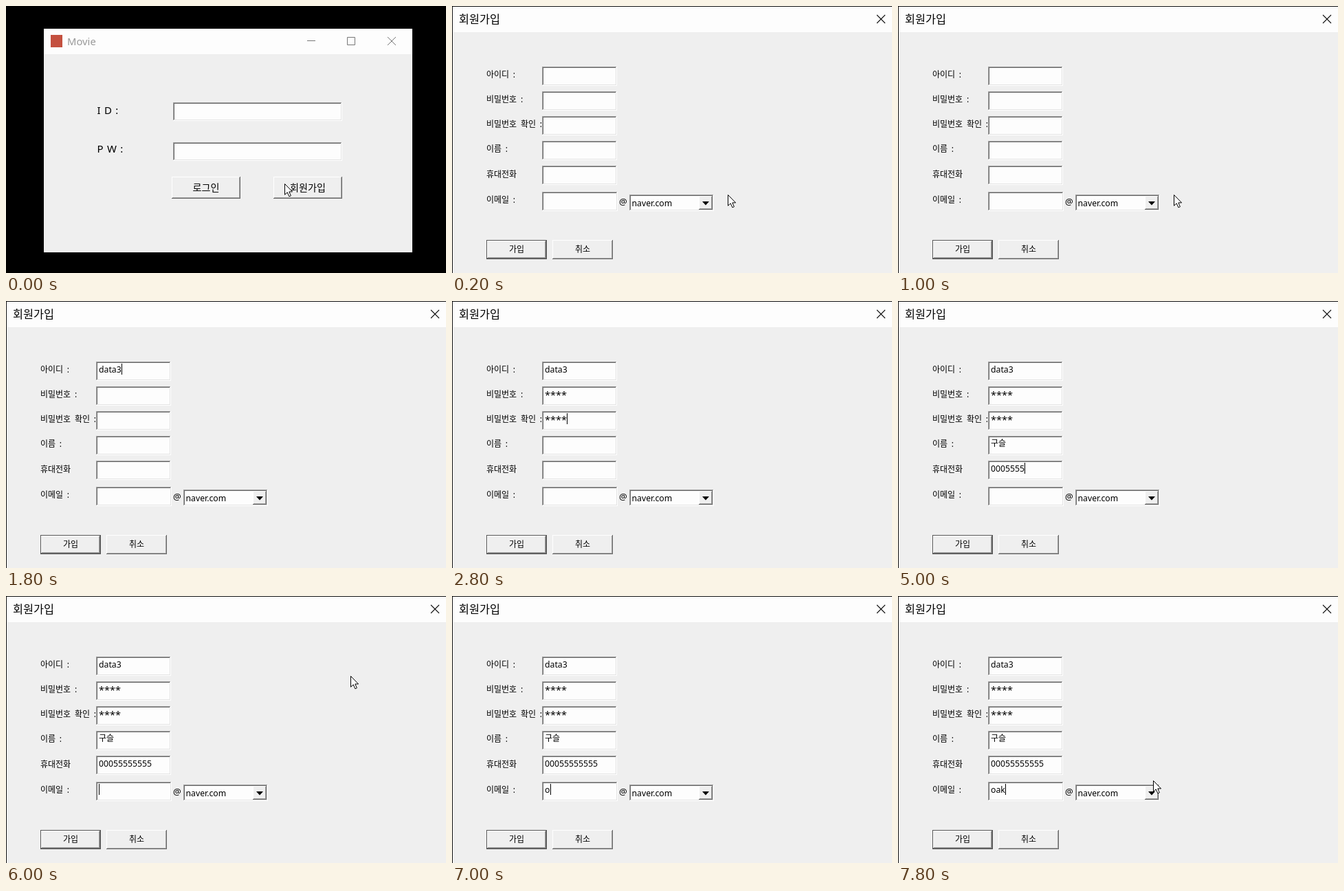
An HTML page that plays this animation: 640 px wide and 388 px high, repeating every 8000 ms.

```html
<!DOCTYPE html>
<html lang="ko">
<head>
<meta charset="utf-8">
<title>회원가입</title>
<style>
  html, body { margin: 0; width: 100%; height: 100%; overflow: hidden; background: #000; }
  svg { display: block; width: 100vw; height: 100vh; }
  text { font-family: "Noto Sans", "Noto Sans CJK KR", "Noto Sans CJK", sans-serif; fill: #000; white-space: pre; }
</style>
</head>
<body>
<svg id="stage" viewBox="0 0 640 388">
  <g id="login"></g>
  <g id="join"></g>
  <g id="pointer">
    <path d="M.5 .5V16.2L4.2 12.8L6.9 18.8L9.4 17.7L6.8 11.9H11.6Z" fill="#fff" stroke="#000"/>
  </g>
</svg>
<script>
const LOOP = 8000, STEP = 200;
const $ = id => document.getElementById(id);

function add(parent, tag, attrs, content) {
  const el = document.createElementNS("http://www.w3.org/2000/svg", tag);
  for (const key in attrs) el.setAttribute(key, attrs[key]);
  if (content) el.textContent = content;
  return parent.appendChild(el);
}
const rect = (g, x, y, width, height, fill) => add(g, "rect", { x, y, width, height, fill });
const line = (g, d, stroke = "#000", width = 1) =>
  add(g, "path", { d, stroke, "stroke-width": width, fill: "none" });
const label = (g, x, y, size, str, more) => add(g, "text", { x, y, "font-size": size, ...more }, str);

// Rectangle with separate top-left and bottom-right edge colours
function bevel(g, x, y, w, h, fill, light, dark) {
  rect(g, x, y, w, h, dark);
  rect(g, x, y, w - 1, h - 1, light);
  rect(g, x + 1, y + 1, w - 2, h - 2, fill);
}
function sunken(g, x, y, w, h) {
  bevel(g, x, y, w, h, "#fff", "#a0a0a0", "#fff");
  bevel(g, x + 1, y + 1, w - 2, h - 2, "#fdfdfd", "#696969", "#e3e3e3");
}
function raised(g, x, y, w, h) {
  bevel(g, x, y, w, h, "#efefef", "#fff", "#696969");
  bevel(g, x + 1, y + 1, w - 2, h - 2, "#efefef", "#efefef", "#a0a0a0");
}
function button(g, x, y, w, h, str, size) {
  raised(g, x, y, w, h);
  label(g, x + w / 2, y + h / 2 + size * .36, size, str, { "text-anchor": "middle" });
}

function buildLogin(g) {
  rect(g, 0, 0, 640, 388, "#000");
  rect(g, 55, 33, 536, 325, "#efefef");
  rect(g, 55, 33, 536, 37, "#fdfdfd");
  rect(g, 65, 42, 17, 18, "#c4503f");
  label(g, 89, 57, 14.8, "Movie", { style: "fill:#999" });
  line(g, "M438 50.5H450M496.5 45.5H507.5V56.5H496.5ZM555 45L567 57M567 45L555 57", "#777");
  label(g, 132.5, 157, 15, "I D :", { "word-spacing": 1.5 });
  label(g, 132.5, 213, 15, "P W :", { "word-spacing": 1.5 });
  sunken(g, 243, 140, 246, 27);
  sunken(g, 243, 198, 246, 27);
  button(g, 241, 248, 100, 32, "로그인", 14.1);
  button(g, 389, 248, 100, 32, "회원가입", 14.1);
}

const rows = [
  ["아이디 :", 88, 104], ["비밀번호 :", 124, 140], ["비밀번호 확인 :", 160, 176],
  ["이름 :", 196, 212], ["휴대전화", 232, 249], ["이메일 :", 270, 286]
];

// Successive contents of each field from its start time; "" means only focused
const NAME = 3;
const entries = [
  { start: 400, keys: ["", "", "", "", "", "d", "dat", "data3"] },
  { start: 2000, keys: ["**", "****"] },
  { start: 2400, keys: ["", "**", "****"] },
  { start: 3000, keys: ["", "ㄱ", "굿", "구스", "구슬", "구슬"] },
  { start: 4200, keys: ["", "", "", "000", "0005555", "0005555555", "00055555555"] },
  { start: 5600, keys: ["", "", "", "", "", "", "", "o", "oa", "oak"] }
];
const composing = t => t >= 3200 && t < 4000;

const fields = [];
let mark, caret, markText;

function buildJoin(g) {
  rect(g, 0, 0, 640, 388, "#efefef");
  rect(g, 0, 0, 640, 38, "#fdfdfd");
  line(g, "M0 .5H640M.5 0V388", "#111");
  label(g, 10, 24.5, 16.3, "회원가입");
  line(g, "M618 13L630 25M630 13L618 25", "#111", 1.1);
  rows.forEach(([name, y, base], i) => {
    label(g, 50, base, 12, name, { "word-spacing": 2.6 });
    sunken(g, 131, y, i == 5 ? 110 : 109, 28);
    const secret = i == 1 || i == 2;
    const size = secret ? 14.5 : i == NAME ? 12 : 12.25;
    fields.push(label(g, 135, y + (secret ? 18 : i == NAME ? 15 : 16), size, ""));
  });
  label(g, 243, 289, 13, "@");
  sunken(g, 258, 274, 123, 24);
  label(g, 261.5, 291, 12.25, "naver.com");
  raised(g, 359, 276, 20, 20);
  add(g, "path", { d: "M364 284H374L369 289.5Z" });
  rect(g, 50, 340, 88, 28, "#555");
  button(g, 51, 341, 86, 26, "가입", 12);
  button(g, 146, 340, 88, 28, "취소", 12);
  mark = rect(g, 146, 199, 11, 16, "#000");
  markText = label(g, 146, 211, 12, "", { style: "fill:#fff" });
  caret = rect(g, 0, 0, 1, 16, "#000");
}

// Visible stretches of the pointer: from, until, start and end position
const moves = [
  [0, 200, 405, 258, 405, 258], [200, 1400, 401, 274, 401, 274],
  [4200, 4800, 458, 116, 460, 116], [5800, 6000, 480, 116, 480, 116],
  [6000, 7000, 501, 116, 371, 268], [7800, 8000, 371, 268, 371, 268]
];

function drawPointer(t) {
  const m = moves.find(([from, until]) => t >= from && t < until);
  $("pointer").style.display = m ? "" : "none";
  if (!m) return;
  const [from, until, x0, y0, x1, y1] = m;
  const k = Math.min(1, (t - from) / (until - from - STEP || 1));
  $("pointer").setAttribute("transform", `translate(${x0 + (x1 - x0) * k} ${y0 + (y1 - y0) * k})`);
}

function drawFields(t) {
  let active = -1, idle = 0;
  entries.forEach(({ start, keys }, i) => {
    const n = Math.min(keys.length - 1, Math.floor((t - start) / STEP));
    let str = n < 0 ? "" : keys[n];
    if (n >= 0) {
      active = i;
      idle = t - start - keys.indexOf(str) * STEP;
    }
    if (i == NAME) {
      const open = composing(t);
      mark.style.display = open ? "" : "none";
      mark.setAttribute("x", 135 + (str.length - 1) * 11);
      markText.setAttribute("x", 135 + (str.length - 1) * 11);
      markText.textContent = open ? str.slice(-1) : "";
      if (open) str = str.slice(0, -1);
    }
    fields[i].textContent = str;
  });
  const on = active >= 0 && !composing(t) && idle % 1000 < 500;
  caret.style.display = on ? "" : "none";
  if (!on) return;
  const f = fields[active];
  const width = f.textContent ? f.getComputedTextLength() : 0;
  caret.setAttribute("x", Math.round(135.4 + width));
  caret.setAttribute("y", rows[active][1] + 3);
}

function draw(time) {
  const t = Math.floor((time % LOOP) / STEP) * STEP;
  $("login").style.display = t < 200 ? "" : "none";
  $("join").style.display = t < 200 ? "none" : "";
  if (t >= 200) drawFields(t);
  drawPointer(t);
}

buildLogin($("login"));
buildJoin($("join"));
let origin;
function tick(now) {
  origin ??= now;
  draw(now - origin);
  requestAnimationFrame(tick);
}
draw(0);
requestAnimationFrame(tick);
</script>
</body>
</html>
```
